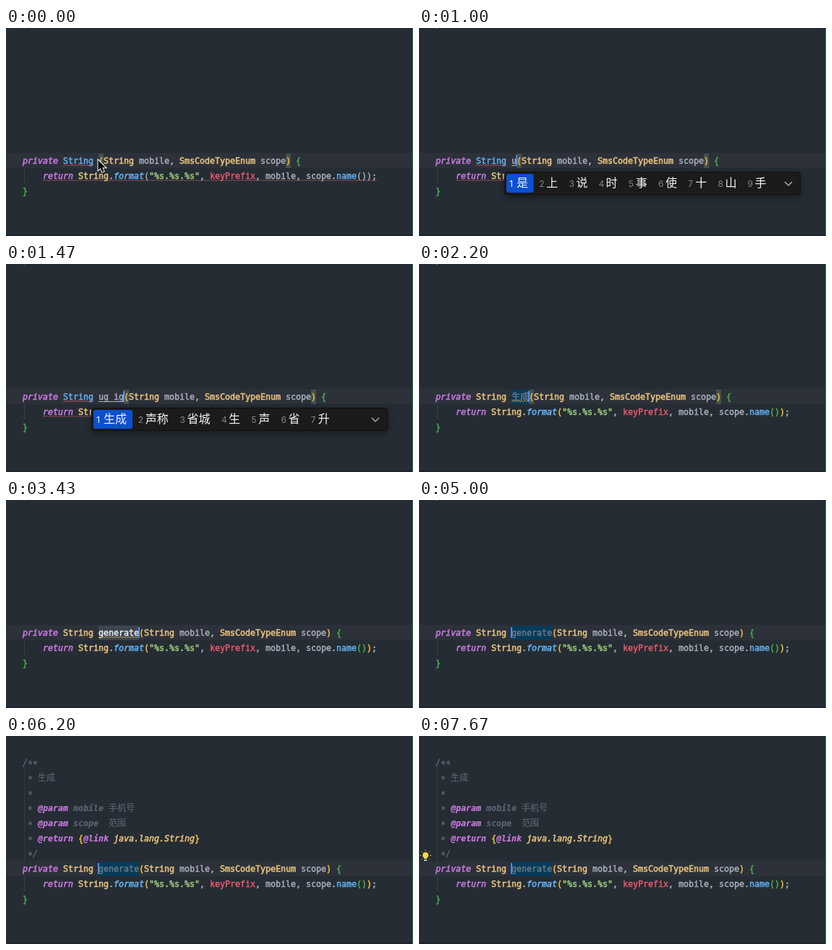
Recreate the animation shown at these times as an HTML page with a canvas. Size 563 by 288 pixels, loop 7710 ms.

```html
<!DOCTYPE html>
<html lang="zh">
<head>
<meta charset="utf-8">
<style>
  html, body { margin: 0; width: 100%; height: 100%; overflow: hidden; background: #252c33; }
  canvas { display: block; }
</style>
</head>
<body>
<canvas id="stage" width="563" height="288"></canvas>
<script>
const ctx = document.getElementById('stage').getContext('2d');
const LOOP = 7710, COL = 7, LINE = 21, LEFT = 23, BASE = 188;
const NAME_X = LEFT + 15 * COL;
const MONO = '"DejaVu Sans Mono", "Noto Sans CJK SC", "Noto Sans CJK", monospace';
const SANS = '"Noto Sans CJK SC", "Noto Sans CJK", sans-serif';

// Token styles: [colour, font prefix, extra weight, vertical offset]
const STYLES = {
  plain: ['#abb2bf', '', 0.4],
  keyword: ['#c678dd', 'italic', 0.6],
  type: ['#e5c07b', '', 0.6],
  call: ['#61afef', '', 0.5],
  method: ['#61afef', 'italic', 0.6],
  text: ['#98c379', '', 0.6],
  field: ['#ef596f', '', 0.4],
  outer: ['#e8ba36', '', 0.6],
  inner: ['#48a84c', '', 0.6],
  unused: ['#6c7986', '', 0.4],
  chosen: ['#e8ebf0', '', 0.5],
  doc: ['#5c6370', 'italic', 0.4],
  star: ['#5c6370', 'italic', 0.4, 2],
  docCjk: ['#5c6370', '', 0.2],
  docName: ['#5c6370', 'italic bold', 0.2],
  tag: ['#c678dd', 'italic bold', 0.2],
  docType: ['#e5c07b', 'italic', 0.6],
  brace: ['#e8ba36', '', 0.6]
};

const SIGNATURE = [
  'outer', '(', 'type', 'String', 'plain', ' mobile, ', 'type', 'SmsCodeTypeEnum',
  'plain', ' scope', 'outer', ')', 'inner', ' {'
];
const body = broken => [
  'keyword', 'return ', 'type', 'String', 'plain', '.', 'method', 'format',
  broken ? 'plain' : 'outer', '(',
  'text', '"%s.%s.%s"', 'plain', ', ', 'field', 'keyPrefix', 'plain', ', mobile, scope.',
  'call', 'name', broken ? 'plain' : 'inner', '()', broken ? 'plain' : 'outer', ')', 'plain', ';'
];
const COMMENT = [
  ['doc', '/', 'star', '**'],
  ['star', ' * ', 'docCjk', '生成'],
  ['star', ' *'],
  ['star', ' * ', 'tag', '@param', 'docName', ' mobile ', 'docCjk', '手机号'],
  ['star', ' * ', 'tag', '@param', 'docName', ' scope  ', 'docCjk', '范围'],
  ['star', ' * ', 'tag', '@return ', 'brace', '{', 'tag', '@link', 'docType', ' java.lang.String', 'brace', '}'],
  ['star', ' *', 'doc', '/']
];

// Text in front of the parameter list: [start, text, style, width]
const NAMES = [
  [0, '', 'plain', 0],
  [1000, 'u', 'plain', 7],
  [1100, 'ug', 'plain', 14],
  [1300, 'ug i', 'plain', 28],
  [1430, 'ug ig', 'plain', 35],
  [1730, '生成', 'plain', 24],
  [2100, '生成', 'unused', 24],
  [2530, '生成', 'chosen', 24],
  [3370, 'generate', 'chosen', 56],
  [4830, 'generate', 'unused', 56]
];
const CANDIDATES = [
  [0, ''],
  [1000, '是 上 说 时 事 使 十 山 手'],
  [1100, '生 声 省 升 胜 剩 圣 盛 绳'],
  [1300, '生成 声称 省城 生 声 省 升'],
  [1730, '']
];

const latest = (list, t) => list.filter(item => item[0] <= t).pop();
const between = (t, from, to) => t >= from && t < to;

function rect(color, x, y, w, h) {
  ctx.fillStyle = color;
  ctx.fillRect(x, y, w, h);
}

function panel(color, x, y, w, h, r, border) {
  ctx.beginPath();
  ctx.roundRect(x, y, w, h, r);
  ctx.fillStyle = color;
  ctx.fill();
  if (border) {
    ctx.strokeStyle = border;
    ctx.lineWidth = 1;
    ctx.stroke();
  }
}

function shadowed(drawPanel) {
  ctx.save();
  ctx.shadowColor = 'rgba(0, 0, 0, 0.4)';
  ctx.shadowBlur = 8;
  ctx.shadowOffsetY = 3;
  drawPanel();
  ctx.restore();
}

function path(points, color, width) {
  ctx.beginPath();
  points.forEach(([x, y]) => ctx.lineTo(x, y));
  ctx.strokeStyle = color;
  ctx.lineWidth = width;
  ctx.stroke();
}

function label(text, x, y, font, color) {
  ctx.font = font;
  ctx.fillStyle = color;
  ctx.fillText(text, x, y);
}

function code(x, y, tokens) {
  for (let i = 0; i < tokens.length; i += 2) {
    const [color, prefix, weight, dy = 0] = STYLES[tokens[i]], text = tokens[i + 1];
    const size = text > '\u2fff' ? 12 : 11.63;
    ctx.font = `${prefix} ${size}px ${MONO}`;
    ctx.fillStyle = ctx.strokeStyle = color;
    ctx.lineWidth = weight;
    ctx.fillText(text, x, y + dy);
    ctx.strokeText(text, x, y + dy);
    x += ctx.measureText(text).width;
  }
}

function wave(x, y, width, color) {
  const points = [];
  for (let dx = 0; dx <= width; dx += 2) points.push([x + dx, y + (dx % 4 ? -1 : 1)]);
  path(points, color, 0.8);
}

function inputMenu(words) {
  shadowed(() => panel('#1b1b1c', 118, 199, 410, 32, 4));
  panel('#1b1b1c', 118.5, 199.5, 409, 31, 4, '#101011');
  let x = 121;
  words.split(' ').forEach((word, i) => {
    const width = 16.5 * word.length;
    if (!i) panel('#0a50d0', x, 202, 21 + width, 26, 3);
    label(i + 1, x + 4, 220, '12px Inter, sans-serif', i ? '#858585' : '#fff');
    label(word, x + 14, 220, `500 16px ${SANS}`, '#f4f4f4');
    x += 24.7 + width;
  });
  path([[506, 213], [511, 218], [516, 213]], '#a8a8a8', 1.5);
}

function actionMenu() {
  panel('#21252b', 117.5, 195.5, 186, 61, 0, '#363c46');
  rect('#323844', 118, 196, 185, 20);
  ['生成文档注释', '安全删除方法', '添加注解'].forEach((text, i) =>
    label(text, 140, 210 + 20 * i, `12px ${SANS}`, i ? '#9da5b4' : '#d7dae0'));
}

function bulb() {
  for (let i = -3; i <= 3; i++) {
    const a = i * Math.PI / 4 - Math.PI / 2, c = Math.cos(a), s = Math.sin(a);
    path([[9 + 6 * c, 165.5 + 6 * s], [9 + 8 * c, 165.5 + 8 * s]], '#d9b63c', 1);
  }
  panel('#f5d84b', 5, 161, 8, 8, 4);
  rect('#f5d84b', 7, 167, 4, 3);
  rect('#b9bdc4', 7, 171, 4, 2);
}

function mouse() {
  ctx.save();
  ctx.translate(127.5, 183);
  ctx.beginPath();
  [[0, 0], [0, 14], [3.2, 11], [5.6, 16.5], [8, 15.5], [5.8, 10.2], [10.2, 10.2]]
    .forEach(([x, y]) => ctx.lineTo(x, y));
  ctx.closePath();
  ctx.strokeStyle = '#fff';
  ctx.lineWidth = 2;
  ctx.stroke();
  ctx.fillStyle = '#000';
  ctx.fill();
  ctx.restore();
}

function draw(t) {
  const [, name, style, width] = latest(NAMES, t);
  const broken = t < 2100, documented = t >= 5700;
  const paramsX = NAME_X + width;

  rect('#252c33', 0, 0, 563, 288);
  rect('#2c313a', 0, 173, 562, 21);
  rect('#1f2429', 0, 286, 562, 2);
  rect('#0b7a3c', 562, 0, 1, 288);
  rect('#3a404a', 25, 195, 1, 20);

  if (documented) {
    rect('#343a43', 25, 48, 1, 125);
    COMMENT.forEach((line, i) => code(LEFT, BASE + (i - 7) * LINE, line));
  } else {
    rect('#56705c', 24, 0, 2, 1);
  }

  if (style === 'unused') rect('#063b5a', NAME_X, 174, width, 20);
  if (style === 'chosen') rect('#3e4450', NAME_X, 174, width, 20);
  if (t < 2530) {
    rect('#43504b', paramsX, 174, COL, 20);
    rect('#43504b', paramsX + 37 * COL, 174, COL, 20);
  }

  if (broken) {
    wave(79, 190, 42, '#d0505a');
    wave(51, 211, 462, '#a5525c');
  }

  code(LEFT, BASE, ['keyword', 'private ', broken ? 'call' : 'type', 'String']);
  code(NAME_X, BASE, [style, name]);
  code(paramsX, BASE, SIGNATURE);
  code(LEFT + 4 * COL, BASE + LINE, body(broken));
  code(LEFT, BASE + 2 * LINE, ['inner', '}']);

  if (between(t, 1000, 1730)) rect('#abb2bf', NAME_X, 190, width, 1);
  if (between(t, 2100, 3870)) wave(NAME_X, 190, width, '#c9a545');

  const atStart = t >= 4830;
  if (t >= 300 && !between(t, 5300, 5650))
    rect('#528bff', atStart ? NAME_X - 1 : paramsX - 1, 176, 2, 15);

  if (between(t, 3500, 4830) || t >= 6500) bulb();
  const words = latest(CANDIDATES, t)[1];
  if (words) inputMenu(words);
  if (between(t, 5300, 5650)) actionMenu();
  if (t < 1000) mouse();
}

function frame() {
  draw(performance.now() % LOOP);
  requestAnimationFrame(frame);
}
frame();
</script>
</body>
</html>
```
